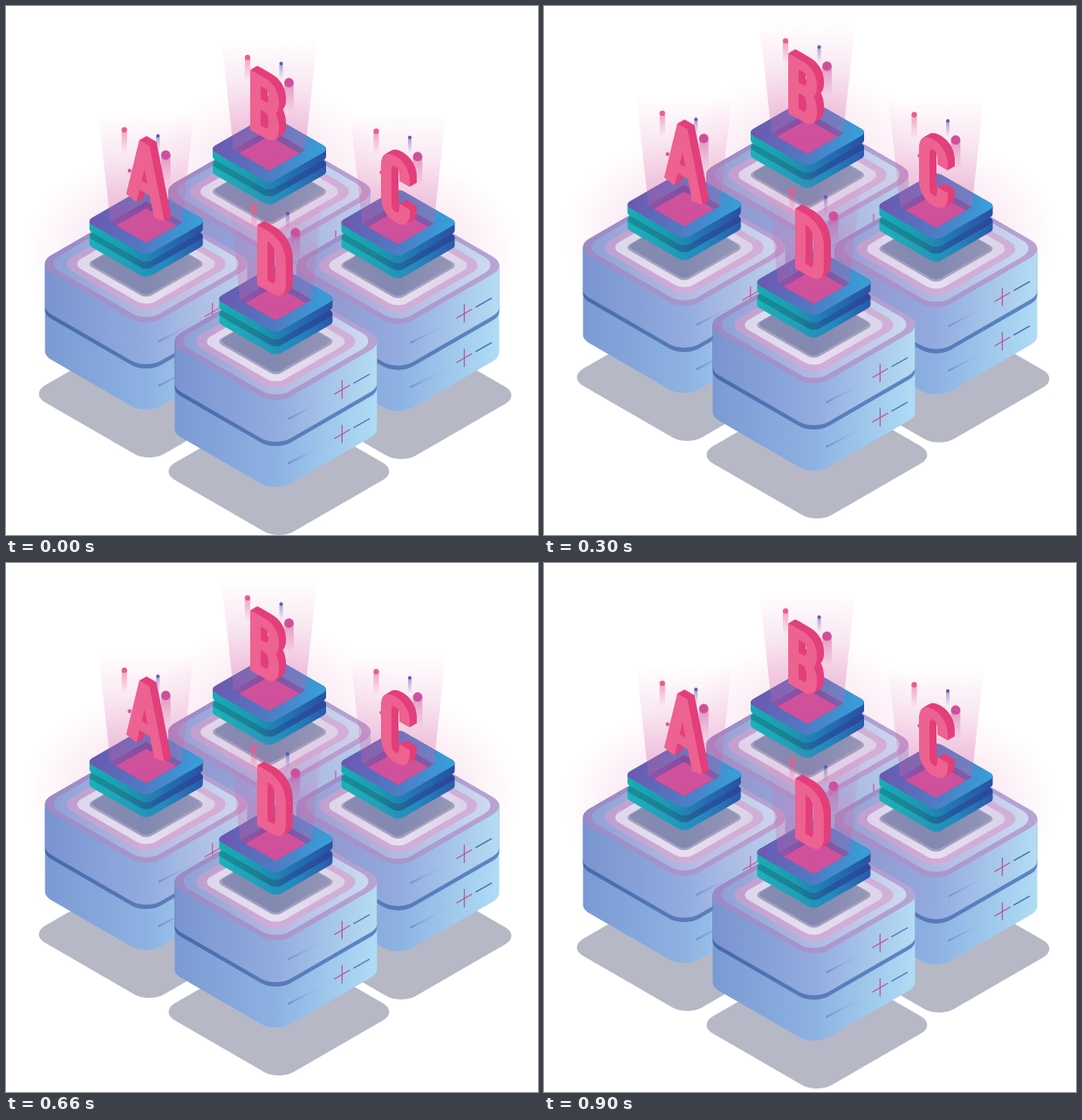
An HTML page with a canvas for the animation above (0.96 s loop, 610 px wide and 607 px high).

```html
<!DOCTYPE html>
<html lang="en">
<head>
<meta charset="utf-8">
<title>Floating blocks</title>
<style>
  html, body { margin: 0; width: 100%; height: 100%; overflow: hidden; background: #fff; }
  canvas { display: block; }
</style>
</head>
<body>
<canvas id="stage" width="610" height="607"></canvas>
<script>
const ctx = document.getElementById('stage').getContext('2d');
const SLOPE = 0.577;
const STEP_MS = 60, STEPS = 16, LIFT = 30;

// Letter outlines live in a plane that slopes down to the right.
const letters = {
  A: { x: -23, y: 236, path: 'M6 70L20 4H22L38 76M11 49H32' },
  B: { x: -22, y: 245, path: 'M6 6H17Q27 6 27 19.5T17 33H6ZM17 33Q27 33 27 48T17 63H6V33' },
  C: { x: -19.5, y: 250, path: 'M27 26V20Q27 6 16.5 6T6 20V56Q6 70 16.5 70T27 56V52' },
  D: { x: -21.5, y: 251, path: 'M6 6H14Q27 8 27 26V48Q27 63 17 63H6Z' }
};
for (const letter of Object.values(letters)) letter.shape = new Path2D(letter.path);

// Back to front: name, centre x, vertical shift.
const stacks = [
  ['B', 302, -172],
  ['A', 160.7, -89],
  ['C', 449.5, -87.3],
  ['D', 309.4, 0]
];

function gradient(x0, y0, x1, y1, colors) {
  const g = ctx.createLinearGradient(x0, y0, x1, y1);
  colors.forEach((c, i) => g.addColorStop(i / (colors.length - 1), c));
  return g;
}

const across = (half, ...colors) => gradient(-half, 0, half, 0, colors);

// Adds a rounded isometric square of the given half width to the path.
function addTile(x, y, half, r) {
  const side = Math.SQRT2 * (half + r * (Math.SQRT2 - 1));
  ctx.save();
  ctx.translate(x, y);
  ctx.scale(1, SLOPE);
  ctx.rotate(Math.PI / 4);
  ctx.roundRect(-side / 2, -side / 2, side, side, r);
  ctx.restore();
}

function tile(x, y, half, r, fill) {
  ctx.beginPath();
  addTile(x, y, half, r);
  ctx.fillStyle = fill;
  ctx.fill();
}

function prism(y, height, half, r, fill) {
  ctx.beginPath();
  addTile(0, y, half, r);
  addTile(0, y + height, half, r);
  ctx.rect(-half, y, half * 2, height);
  ctx.fillStyle = fill;
  ctx.fill();
}

function line(x0, y0, x1, y1, width, stroke) {
  ctx.beginPath();
  ctx.moveTo(x0, y0);
  ctx.lineTo(x1, y1);
  ctx.lineWidth = width;
  ctx.strokeStyle = stroke;
  ctx.stroke();
}

function drawGlow() {
  const g = ctx.createRadialGradient(0, 0, 0, 0, 0, 140);
  g.addColorStop(0, 'rgba(222,130,186,.34)');
  g.addColorStop(1, 'rgba(240,150,195,0)');
  ctx.save();
  ctx.translate(0, 370);
  ctx.scale(1, 0.78);
  ctx.fillStyle = g;
  ctx.fillRect(-140, -140, 280, 280);
  ctx.restore();
}

function drawMarks(y) {
  line(14, y + 34, 53, y + 14, 2,
    gradient(14, 0, 53, 0, ['#718fca', 'rgba(160,185,230,.15)']));
  line(76, y - 10.5, 76, y + 10.5, 1.3, '#b9579d');
  line(67, y + 5.5, 85, y - 5, 1.3, '#c4508f');
  line(89, y - 7, 107.5, y - 17.5, 1.4, '#3f70b4');
}

function drawBlock() {
  prism(433, 52, 116, 24, across(116, '#7b9ad4', '#8db2e2', '#afdcf5'));
  prism(385, 53, 116, 24, across(116, '#456aab', '#587ab8', '#5c86c2'));
  prism(385, 48, 116, 24, across(116, '#7994cf', '#93abdf', '#b5dcf3'));

  tile(0, 385, 116, 24, across(116, '#9b8ac5', '#a795cc', '#b9a3d3'));
  tile(0, 384.5, 106, 22, across(106, '#8ea1d6', '#b1b9e1', '#cbdbf1'));
  tile(0, 385, 91, 20, across(91, '#bda0d0', '#d0add6', '#d1b0d8'));
  tile(0, 385, 79, 15, across(79, '#ded7ec', '#e7dff0', '#dcd3e9'));
  tile(0, 385, 65, 9, '#a1a2bf');
  tile(0, 384, 62, 8, across(62, '#868bb2', '#8388b0', '#9496b7'));

  drawMarks(440);
  drawMarks(491);
}

function drawPlatform() {
  const side = across(65, '#19acb6', '#1c9ab2', '#2371b2', '#2a51a2');
  prism(353, 9, 65, 9, across(65, '#1db1b9', '#219fb8', '#2289bd', '#2b59aa'));
  tile(0, 353, 65, 9, across(65, '#178f99', '#1b8092', '#25579f', '#2b469b'));
  prism(336, 9, 65, 9, side);
  tile(0, 336, 65, 9, gradient(-60, 325, 60, 345, ['#6d58b1', '#5079c3', '#379fd9']));

  ctx.save();
  ctx.beginPath();
  addTile(0, 337, 41, 1);
  ctx.clip();
  tile(0, 337, 42, 1, across(41, '#6652aa', '#64429b', '#4d63b0'));
  tile(0, 345, 41, 1, '#cf4b98');
  ctx.restore();
}

function drawBeam() {
  ctx.beginPath();
  ctx.moveTo(-55, 210);
  ctx.lineTo(55, 210);
  ctx.lineTo(41, 337);
  ctx.lineTo(0, 361);
  ctx.lineTo(-41, 337);
  ctx.closePath();
  ctx.fillStyle = gradient(0, 210, 0, 361, ['rgba(222,110,172,0)', 'rgba(205,88,160,.44)']);
  ctx.fill();
}

function drawSpark(x, y, r, tail, rgb) {
  if (tail) {
    ctx.fillStyle = gradient(0, y, 0, y + tail, [`rgba(${rgb},.55)`, `rgba(${rgb},0)`]);
    ctx.fillRect(x - r, y, r * 2, tail);
  }
  ctx.beginPath();
  ctx.arc(x, y, r, 0, Math.PI * 2);
  ctx.fillStyle = `rgb(${rgb})`;
  ctx.fill();
}

function drawSparks() {
  drawSpark(-25, 231, 3.1, 27, '235,92,140');
  drawSpark(13.5, 238, 2, 18, '92,92,177');
  drawSpark(22.5, 260, 5.4, 34, '207,80,154');
  drawSpark(-19, 278, 2.2, 0, '229,84,143');
}

function drawLetter({ x, y, shape }) {
  ctx.lineWidth = 12;
  ctx.miterLimit = 2;
  for (let depth = 8; depth >= 0; depth -= 0.5) {
    ctx.save();
    ctx.transform(1, SLOPE, 0, 1, x + depth, y - depth * SLOPE);
    ctx.strokeStyle = depth ? '#e33f7b' : '#ed6290';
    ctx.stroke(shape);
    ctx.restore();
  }
}

function drawStack(name, x, y) {
  ctx.save();
  ctx.translate(x, y);
  drawGlow();
  drawBlock();
  drawPlatform();
  drawBeam();
  drawSparks();
  drawLetter(letters[name]);
  ctx.restore();
}

function render(now) {
  const step = Math.floor(now / STEP_MS) % STEPS;
  const rise = LIFT * (1 - Math.abs(1 - step / (STEPS / 2)));

  ctx.fillStyle = '#fff';
  ctx.fillRect(0, 0, 610, 607);
  ctx.save();
  ctx.translate(0, Math.round(-rise));
  for (const [, x, y] of stacks) tile(x + 3.5, y + 534, 126.5, 24, '#b6b8c6');
  for (const stack of stacks) drawStack(...stack);
  ctx.restore();
}

let start;
function tick(now) {
  start ??= now;
  render(now - start);
  requestAnimationFrame(tick);
}
render(0);
requestAnimationFrame(tick);
</script>
</body>
</html>
```
